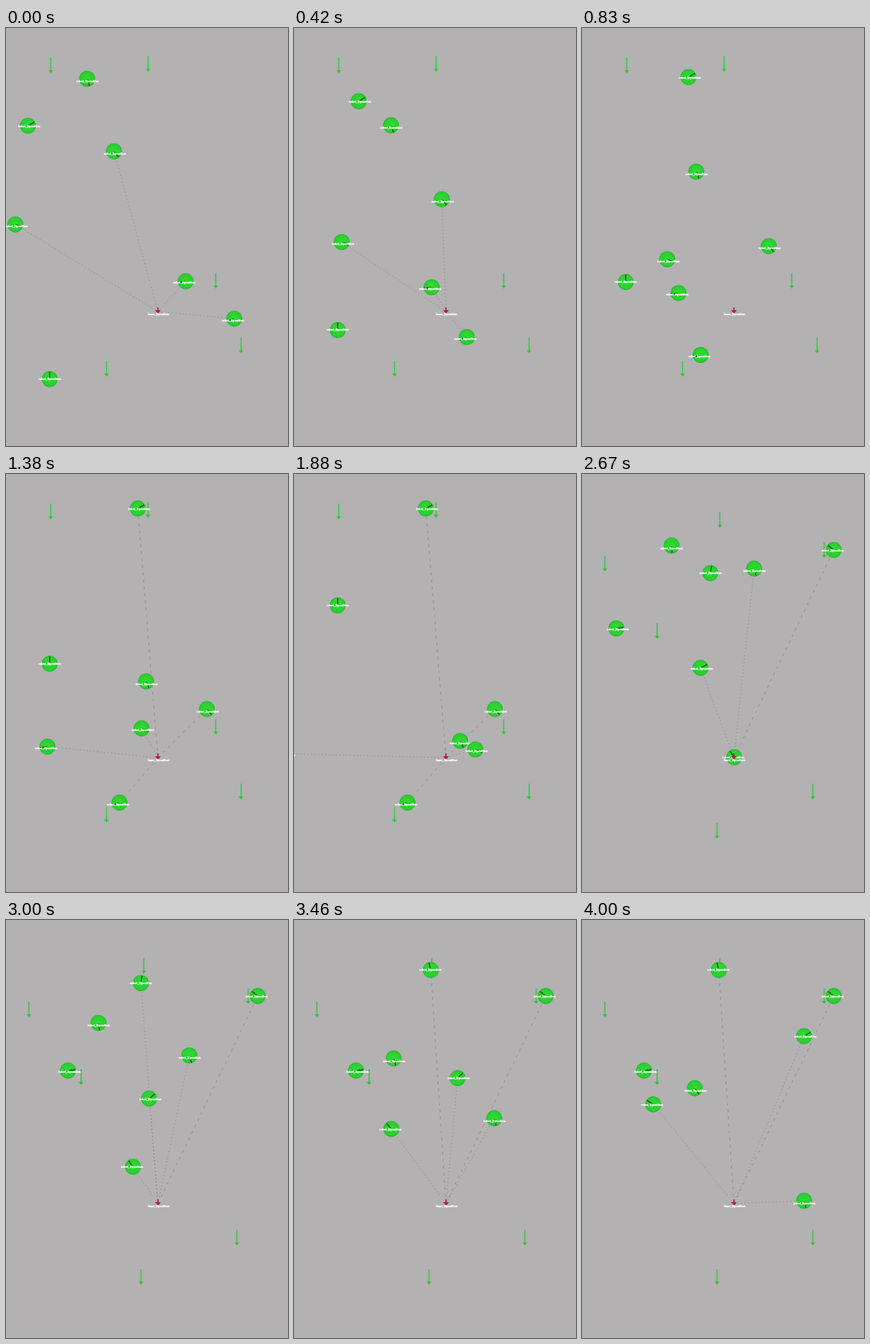
Animation of 400 by 594 pixels, one loop 4.04 s. Source, as an HTML page with a canvas:

```html
<!DOCTYPE html>
<html lang="en">
<head>
<meta charset="utf-8">
<title>Robots moving to goals</title>
<style>
html, body { margin: 0; width: 400px; height: 594px; overflow: hidden; background: #b3b1b2; }
canvas { display: block; }
</style>
</head>
<body>
<canvas id="stage" width="400" height="594"></canvas>
<script>
const ctx = document.getElementById('stage').getContext('2d');
const LOOP = 4040, CUT = 2210;
const base = { x: 215.5, y: 403 };

// A robot follows a Bezier curve through its control points until `stop`;
// its sight line to the base shows from `link` on.
const robot = (points, { stop, link = Infinity } = {}) => ({ points, stop, link });

const scenes = [
  {
    start: 0, end: CUT, color: '#1fd32a',
    goals: [[64, 64], [202, 62], [298, 370], [334, 462], [143, 495]],
    robots: [
      robot([[115, 72], [171, 244], [262, 436]]),
      robot([[31, 139], [187, 49]], { stop: 1080, link: 1100 }),
      robot([[153, 175], [285, 334]], { stop: 980, link: 0 }),
      robot([[13, 279], [300, 411]], { link: 0 }),
      robot([[255, 360], [-59, 404]], { link: 0 }),
      robot([[324, 413], [161, 467]], { stop: 870, link: 0 }),
      robot([[62, 499], [62, 132]])
    ]
  },
  {
    start: CUT, end: 4000, color: '#2fc238',
    goals: [[33, 138], [196, 76], [107, 234], [344, 119], [328, 462], [192, 518]],
    robots: [
      robot([[126, 28], [123, 184], [160, 239]]),
      robot([[224, 62], [261, 193], [315, 399]], { link: CUT }),
      robot([[385, 131], [357, 108]], { stop: 2400, link: CUT }),
      robot([[158, 267], [195, 75], [194, 71]], { stop: 3330, link: 2700 }),
      robot([[-8, 227], [88, 214]], { stop: 2990 }),
      robot([[50, 325], [279, 238], [159, 259], [315, 165]], { link: CUT }),
      robot([[274, 494], [152, 295], [101, 262]], { link: 2700 })
    ]
  }
];

function bezier(points, u) {
  if (points.length === 1) return points[0];
  const [x0, y0] = bezier(points.slice(0, -1), u);
  const [x1, y1] = bezier(points.slice(1), u);
  return [x0 + (x1 - x0) * u, y0 + (y1 - y0) * u];
}

function pose({ points, stop }, scene, t) {
  const u = Math.min(1, (t - scene.start) / ((stop || scene.end) - scene.start));
  const [x, y] = bezier(points, u);
  const [ax, ay] = bezier(points, u - .02), [bx, by] = bezier(points, u + .02);
  const angle = Math.atan2(by - ay, bx - ax);
  return { x, y, dx: Math.cos(angle), dy: Math.sin(angle), stopped: stop && u === 1 };
}

function line(x0, y0, x1, y1, color, width, dash = []) {
  ctx.strokeStyle = color;
  ctx.lineWidth = width;
  ctx.setLineDash(dash);
  ctx.beginPath();
  ctx.moveTo(x0, y0);
  ctx.lineTo(x1, y1);
  ctx.stroke();
}

function arrow(x, top, tip, color, width, head) {
  line(x, top, x, tip - head, color, width);
  ctx.fillStyle = color;
  ctx.beginPath();
  ctx.moveTo(x - head * .8, tip - head);
  ctx.lineTo(x + head * .8, tip - head);
  ctx.lineTo(x, tip + .5);
  ctx.fill();
}

function label(text, x, y) {
  ctx.font = 'bold 4px "Liberation Sans", sans-serif';
  ctx.textAlign = 'center';
  ctx.textBaseline = 'middle';
  ctx.fillStyle = ctx.strokeStyle = '#fff';
  ctx.lineWidth = .3;
  ctx.setLineDash([]);
  ctx.strokeText(text, x, y);
  ctx.fillText(text, x, y);
}

function drawLink({ x, y, stopped }) {
  line(base.x, base.y, x, y, 'rgba(105,95,75,.45)', 1, stopped ? [4, 6] : [1.5, 3.5]);
}

function drawRobot({ x, y, dx, dy }, id) {
  const shade = ctx.createRadialGradient(x, y - 1, 2, x, y, 11.5);
  shade.addColorStop(0, '#2fd933');
  shade.addColorStop(.75, '#29d02d');
  shade.addColorStop(1, '#32b238');
  ctx.fillStyle = shade;
  ctx.beginPath();
  ctx.arc(x, y, 11.4, 0, 7);
  ctx.fill();
  line(x + dx, y + dy, x + dx * 10.5, y + dy * 10.5, '#1d5a18', 1.6);
  label(`robot_${id}/position`, x + dx * 2, y + dy * 2 + 2);
}

function frame() {
  const t = performance.now() % LOOP;
  const scene = scenes[t < CUT ? 0 : 1];
  const poses = scene.robots.map(r => pose(r, scene, t));
  const blackout = t > 600 && t < 1100;

  ctx.fillStyle = '#b3b1b2';
  ctx.fillRect(0, 0, 400, 594);
  scene.robots.forEach((r, i) => {
    if (t >= r.link && !blackout) drawLink(poses[i]);
  });
  scene.goals.forEach(([x, tip]) => arrow(x - .5, tip - 22, tip, scene.color, 1.4, 4));
  poses.forEach(drawRobot);
  arrow(base.x, 397, 406, '#bd174c', 1.8, 5);
  label('base_0/position', base.x + 1, 406.5);
  requestAnimationFrame(frame);
}
frame();
</script>
</body>
</html>
```
